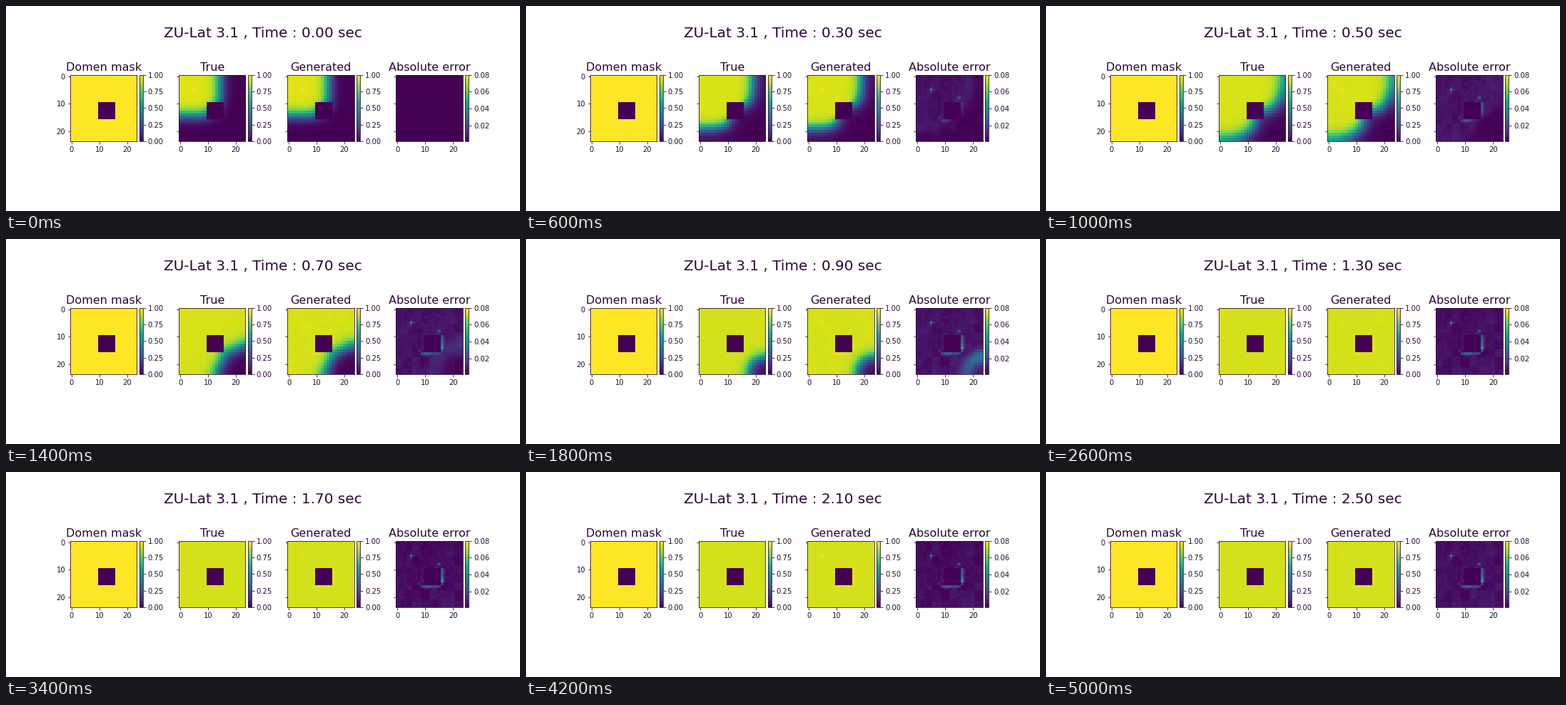
Write a matplotlib script that moves like this. It is 720 px wide and 288 px high and loops after 5200 ms.

```python
import numpy as np
import matplotlib.pyplot as plt
from matplotlib.animation import FuncAnimation

W, H, DPI = 720, 288, 72
N = 24
FRAMES, INTERVAL = 26, 200
STEP = 0.1                     # simulated seconds per frame
SPEED, WIDTH = 16.5, 2.4       # wave front: cells per second, cells
PLATEAU = 0.933
INK = "#2a0636"

plt.rcParams.update({
    "font.family": "DejaVu Sans", "font.size": 10,
    "text.color": INK, "axes.edgecolor": INK, "axes.titlecolor": INK,
    "xtick.color": INK, "ytick.color": INK, "image.cmap": "viridis",
})

rows, cols = np.mgrid[0:N, 0:N].astype(float)
mask = np.ones((N, N))
mask[10:16, 10:16] = 0


def neighbours(a, mode):
    p = np.pad(a, 1, mode=mode)
    return p[:-2, 1:-1], p[2:, 1:-1], p[1:-1, :-2], p[1:-1, 2:]


def excite():
    """Bistable reaction-diffusion wave that flows around the hole."""
    threshold, substeps = 0.05, 50
    dt = STEP / substeps
    ratio = 8 / WIDTH ** 2
    diffusion = SPEED / (np.sqrt(ratio / 2) * (1 - 2 * threshold))
    rate = ratio * diffusion
    open_sides = neighbours(mask, "constant")

    dx = np.maximum(cols - 5, 0)
    dy = np.maximum(rows - 5, 0)
    radius = (dx ** 2.5 + dy ** 2.5) ** 0.4
    u = mask * (0.5 + 0.5 * np.tanh((9.1 - radius) / WIDTH))
    waves = [u]
    for _ in range(FRAMES - 1):
        for _ in range(substeps):
            spread = sum(m * (v - u) for m, v in
                         zip(open_sides, neighbours(u, "edge")))
            growth = rate * u * (1 - u) * (u - threshold)
            u = u + dt * mask * (diffusion * spread + growth)
        waves.append(u)
    return waves


waves = excite()

# error pattern: blocky noise, a bright rim behind the hole, the stimulus cell
rng = np.random.default_rng(4)


def blocks(size):
    n = N // size
    return np.kron(rng.random((n, n)), np.ones((size, size)))


shade = 0.5 + 0.5 * (rows + cols) / (2 * N)
noise = 0.0015 + 0.005 * blocks(3) * shade + 0.003 * blocks(2) * blocks(1)
drift = 0.0015 * blocks(2)
signs = np.where(blocks(2) < 0.5, -0.6, 0.6)
rim = np.exp(-((np.hypot(rows - 12, cols - 12) - 4.4) / 0.6) ** 2)
rim *= 0.042 * blocks(1) * (rows + cols > 22)
spot = 0.034 * np.exp(-2 * ((rows - 5) ** 2 + (cols - 5) ** 2))
hot = rim + spot


def fields(i):
    t, wave = i * STEP, waves[i]
    true = (PLATEAU + 0.022 * np.exp(-t / 0.5)) * wave
    true[5, 5] += (1 - true[5, 5]) * np.exp(-t / 0.12)
    if i == 0:
        return true, true, np.zeros((N, N))
    base = (noise + drift * np.sin(2.5 * t)) * (0.3 + 0.7 * wave)
    peaks = hot * wave
    late = np.exp(-((t - 0.93) / 0.2) ** 2)
    band = 4 * wave * (1 - wave) * (0.032 * late * (cols / N) ** 2 + 0.003)
    error = (base + peaks + band) * mask
    made = np.clip(true + (signs * base + peaks - band) * mask, 0, 1)
    return true, made, error


fig = plt.figure(figsize=(W / DPI, H / DPI), dpi=DPI, facecolor="white")

LEFT, RIGHT, GAP, BAR_GAP = 90, 648, 50.4, 3.65
CELL = (RIGHT - LEFT - 3 * GAP) / 4
SIDE = (CELL - BAR_GAP) / 1.05
BASE = H * 0.5025 - SIDE / 2


def add_axes(x, width):
    return fig.add_axes([x / W, BASE / H, width / W, SIDE / H])


def panel(k, title, lo, hi, ticks):
    x = LEFT + k * (CELL + GAP)
    ax = add_axes(x, SIDE)
    im = ax.imshow(mask, vmin=lo, vmax=hi, aspect="auto",
                   interpolation="nearest")
    ax.set_title(title, fontsize=16)
    ax.set_xticks([0, 10, 20])
    ax.set_yticks([0, 10, 20])
    ax.tick_params(labelleft=(k == 0))
    cax = add_axes(x + SIDE + BAR_GAP, 0.05 * SIDE)
    bar = fig.colorbar(im, cax=cax, ticks=ticks, format="%.2f")
    bar.outline.set_edgecolor(INK)
    return im


quarters = np.linspace(0, 1, 5)
panel(0, "Domen mask", 0, 1, quarters)
im_true = panel(1, "True", 0, 1, quarters)
im_made = panel(2, "Generated", 0, 1, quarters)
im_error = panel(3, "Absolute error", 0.0013, 0.0802,
                 np.linspace(0.02, 0.08, 4))
heading = fig.text(0.5, 1 - 44 / H, "", fontsize=20, ha="center",
                   va="baseline")


def update(i):
    true, made, error = fields(i)
    im_true.set_data(true)
    im_made.set_data(made)
    im_error.set_data(error)
    heading.set_text(f"ZU-Lat 3.1 , Time : {i * STEP:.2f} sec")
    return im_true, im_made, im_error, heading


anim = FuncAnimation(fig, update, frames=FRAMES, interval=INTERVAL,
                     init_func=lambda: update(0), repeat=True,
                     repeat_delay=0, blit=False)
plt.show()
```
